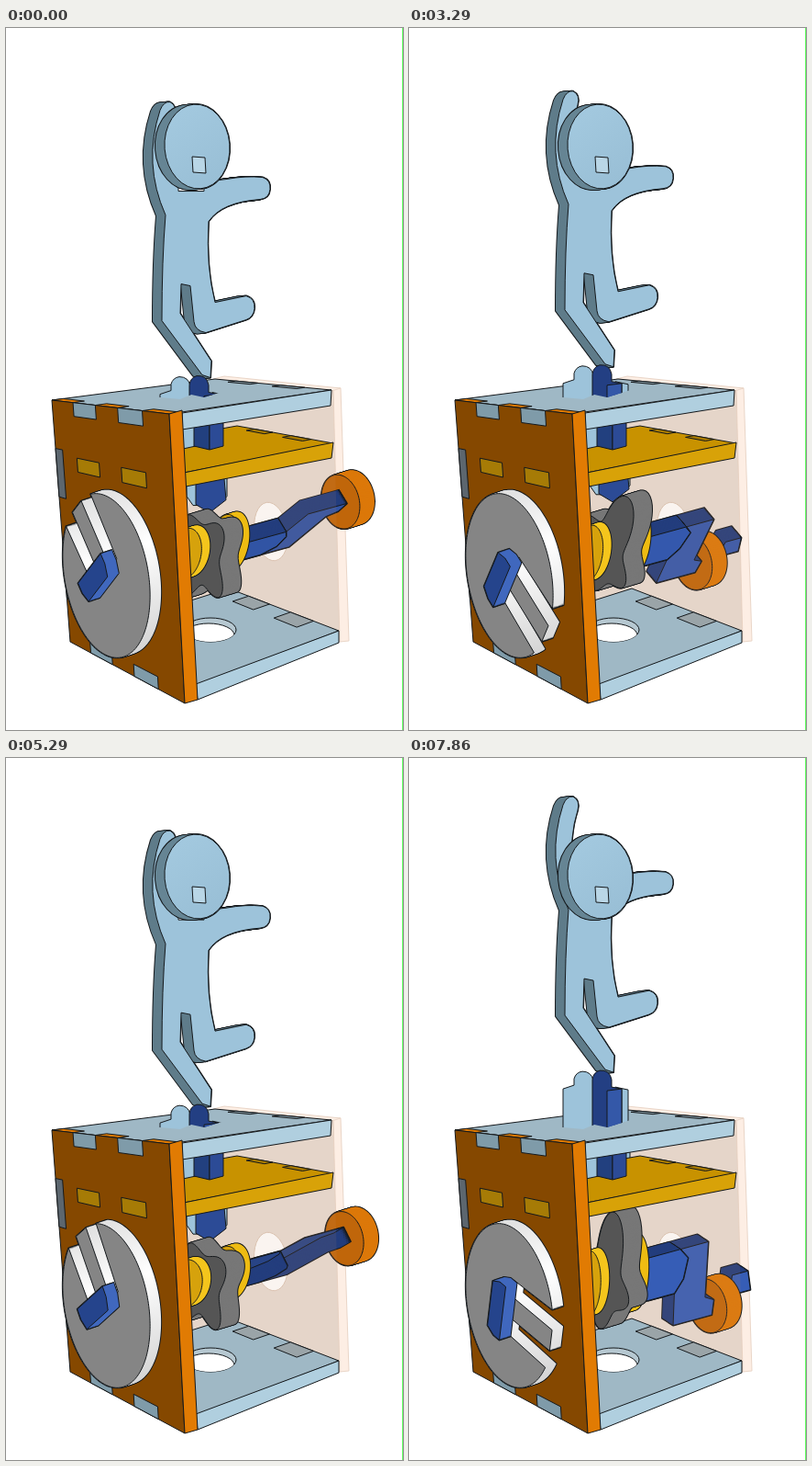
An HTML page with a canvas for the animation above (8 s loop, 433x764 px).

```html
<!DOCTYPE html>
<html lang="en">
<head>
<meta charset="utf-8">
<title>Crank automaton</title>
<style>
html, body { margin: 0; width: 100%; height: 100%; overflow: hidden; background: #fff; }
canvas { display: block; width: 433px; height: 764px; }
</style>
</head>
<body>
<canvas id="stage" width="433" height="764"></canvas>
<script>
const ctx = document.getElementById('stage').getContext('2d');
const LOOP = 8000, STEPS = 56, RAD = Math.PI / 180;
const INK = '#15191c', PALE = '#9dc3da', PLATE = '#9fb8c5', EDGE = '#b0cfdf', NAVY = '#2c4b96', ORANGE = '#e17b03';

// The hand pauses for one step, then turns the crank faster and faster.
function crankAngle(step) {
  const s = step < 3 ? step : step - 1;
  return (37 + 6.56 * s + .1186 * s ** 2 - .0008 * s ** 3) * RAD;
}

// Four cam lobes a quarter turn apart; they shape the cam and raise the dancer.
const LOBES = [25, 18, 59, 25];
const lobeHeight = (a, sharpness) => LOBES.reduce((sum, height, i) =>
  sum + height * Math.exp(sharpness * (Math.cos(a - (90 * i + 2) * RAD) - 1)), 0);
const lift = angle => Math.min(0, 5 - lobeHeight(Math.PI / 2 - angle, 6));

function poly(points) {
  const p = new Path2D();
  points.forEach(([x, y]) => p.lineTo(x, y));
  p.closePath();
  return p;
}

function ellipse(x, y, rx, ry, tilt = 0) {
  const p = new Path2D();
  p.ellipse(x, y, rx, ry, tilt, 0, 7);
  return p;
}

function paint(path, fill, line = INK) {
  ctx.fillStyle = fill;
  ctx.fill(path);
  ctx.strokeStyle = line;
  ctx.lineWidth = 1;
  ctx.stroke(path);
}

function shifted(dx, dy, drawPart) {
  ctx.save();
  ctx.translate(dx, dy);
  drawPart();
  ctx.restore();
}

// Solid made by sweeping a path from (dx, dy) to its own place.
function extrude(path, dx, dy, side, front) {
  const n = Math.ceil(Math.hypot(dx, dy));
  ctx.strokeStyle = INK;
  ctx.lineWidth = 2;
  ctx.fillStyle = side;
  for (const pass of ['stroke', 'fill'])
    for (let i = n; i >= 0; i--) shifted(dx * i / n, dy * i / n, () => ctx[pass](path));
  paint(path, front);
}

// Board with corners a, b (top) and c, d (bottom); rect() works in 0..1 on it.
function board(a, b, c, d) {
  const mix = (p, q, t) => p.map((v, i) => v + (q[i] - v) * t);
  const at = (s, t) => mix(mix(a, b, s), mix(d, c, s), t);
  return { rect: (s0, t0, s1, t1) => poly([at(s0, t0), at(s1, t0), at(s1, t1), at(s0, t1)]) };
}

// Every board carries two finger joints at the same places along its side.
const JOINTS = [[.18, .37], [.56, .77]], GAPS = [[0, .18], [.37, .56], [.77, 1]];
const fingers = (b, spans, t0, t1, fill) => spans.forEach(([s0, s1]) => paint(b.rect(s0, t0, s1, t1), fill));

const front = board([50, 405], [178, 420], [195, 735], [70, 668]);
const corner = board([178, 420], [192, 416], [209, 731], [195, 735]);
const lid = board([50, 405], [178, 420], [355, 394], [228, 382]);
const lidEdge = board([192, 419], [355, 394], [354, 411], [192, 437]);
const shelf = board([252, 433], [357, 452], [194, 484], [110, 458]);
const shelfEdge = board([194, 484], [357, 451], [355, 468], [196, 499]);
const floor = board([243, 610], [363, 656], [208, 715], [100, 655]);
const floorEdge = board([207, 714], [363, 656], [363, 669], [209, 731]);
const panel = board([195, 395], [357, 394], [364, 668], [195, 640]);
const panelEdge = board([357, 392], [365, 392], [374, 667], [364, 668]);
const panelTop = board([226, 382], [238, 379], [365, 392], [355, 395]);
const whole = b => b.rect(0, 0, 1, 1);

// Upright plane seen at an angle: u runs right, v runs up.
const plane = (cx, cy, ux, uy, vx, vy) => (u, v) => [cx + u * ux + v * vx, cy + u * uy + v * vy];
const polar = (map, radius, turn) => poly(Array.from({ length: 120 }, (_, i) => {
  const a = i * 3 * RAD, r = radius(a);
  return map(r * Math.cos(a + turn), r * Math.sin(a + turn));
}));

// Flat piece of the crank; its outline is given along the axle (z) and outwards (r).
function crankPart(outline, angle) {
  const c = Math.cos(angle), s = Math.sin(angle);
  const facing = .5 * c > .8 * s ? 1 : -1, nu = -s * facing, nv = c * facing;
  const at = t => outline.map(([z, r]) =>
    plane(224 + 114 * z, 571 - 31 * z, 46, 11, -8, -62)(r * c + t * nu, r * s + t * nv));
  const near = at(.13), far = at(-.13);
  extrude(poly(near), far[0][0] - near[0][0], far[0][1] - near[0][1], '#233d7d',
    `hsl(222,54%,${34 + 13 * Math.max(0, nu)}%)`);
}

function drawCrank(angle) {
  const [x, y] = plane(333, 543, 46, 11, -8, -60)(Math.cos(angle), Math.sin(angle));
  crankPart([[1.1, .4], [1.25, .4], [1.3, .8], [1.1, .8]], angle);
  extrude(polar(plane(x, y, 21, 5, 0, -29), () => 1, 0), 16, -5, '#dc7809', '#c0660a');
  crankPart([[.3, .45], [.55, .45], [.58, 1.1], [.95, 1.1], [.95, .8], [.86, .7], [.82, -.42], [.3, -.42]], angle);
}

function drawPanel() {
  paint(whole(panel), '#e8dcd3', '#e8dcd3');
  paint(whole(panelEdge), '#fdeee4', '#ead6c8');
  paint(whole(panelTop), '#fdeee4', '#ead6c8');
  paint(ellipse(289, 548, 18, 32, -.15), '#fff', '#dcc8b8');
}

function drawFloor() {
  paint(whole(floor), PLATE);
  fingers(floor, JOINTS, 0, .12, '#9aa4a8');
  paint(whole(floorEdge), EDGE);
  const hole = ellipse(223, 655, 28, 13);
  paint(hole, '#b6c8d1');
  ctx.save();
  ctx.clip(hole);
  paint(ellipse(221, 661, 28, 13), '#fff');
  ctx.restore();
}

function drawFollower() {
  paint(new Path2D('M197 470H241V512L232 522H204L197 512Z'), PALE);
  paint(new Path2D('M207 470H236L240 516L222 530L207 521Z'), NAVY);
}

function drawCams(angle) {
  const cam = a => .4 + .0125 * lobeHeight(a, 9);
  const wing = a => 1 / Math.hypot(Math.cos(a), 1.6 * Math.sin(a));
  extrude(polar(plane(238, 562, 20, 6, -1, -44), wing, angle), 10, -3, '#eebc13', '#d4a00a');
  extrude(polar(plane(214, 572, 42, 12, -2, -74), cam, angle), 20, -6, '#777', '#555');
  extrude(polar(plane(196, 572, 20, 7, -1, -38), wing, angle), 9, -3, '#f4c51d', '#d6a20c');
}

function drawShelves() {
  paint(whole(shelf), '#c89200');
  fingers(shelf, JOINTS, 0, .06, '#a87a00');
  paint(whole(shelfEdge), '#d8a208');
  paint(new Path2D('M192 430H207V455L193 458Z'), PALE);
  paint(new Path2D('M205 430H222V459L205 455Z'), '#22407f');
  paint(new Path2D('M222 430H237V455L222 459Z'), NAVY);
  paint(whole(lid), PLATE);
  fingers(lid, JOINTS, .95, 1, '#879ca7');
  fingers(lid, GAPS, 0, .07, ORANGE);
  paint(whole(lidEdge), EDGE);
}

function drawFront() {
  paint(whole(front), '#854800');
  paint(whole(corner), ORANGE);
  fingers(front, JOINTS, 0, .055, '#7f9ba9');
  fingers(front, JOINTS, .222, .278, '#a67b06');
  fingers(front, JOINTS, .955, 1, '#7f9ba9');
  for (const t of [.2, .62]) paint(front.rect(0, t, .06, t + .2), '#5c666e');
}

function drawDial(angle) {
  const map = plane(109.5, 596, 47.5, 15.5, -3.5, -88);
  const turn = angle + 93 * RAD, c = Math.cos(turn), s = Math.sin(turn);
  const local = ([d, w]) => map(d * c - w * s, d * s + w * c);
  const arc = Array.from({ length: 158 }, (_, i) => [Math.cos((23 + 2 * i) * RAD), Math.sin((23 + 2 * i) * RAD)]);
  const slots = [[.03, -.36], [.03, -.14], [.97, -.14], [.97, .14], [.03, .14], [.03, .36]];
  const rim = ctx.createLinearGradient(90, 500, 165, 685);
  rim.addColorStop(0, '#dcdcdc');
  rim.addColorStop(.4, '#fff');
  rim.addColorStop(1, '#cfcfcf');
  extrude(poly([...arc, ...slots].map(local)), 12, -4, rim, '#858585');
  const staple = [[-.15, -.3], [0, -.36], [.14, -.36], [.14, .36], [0, .36], [-.15, .3]];
  shifted(-14, 3, () => extrude(poly(staple.map(local)), 12, -4, '#4068be', '#25448c'));
}

const bodyShape = new Path2D(`M168 92Q172 82 179 83Q187 87 184 98Q175 125 178 165L215 170L240 167
  Q262 163 280 165Q289 168 288 178Q287 188 277 189Q235 192 221 213Q218 262 228 301L262 294
  Q272 297 271 308Q270 317 262 320L218 334Q206 332 205 322L201 283L191 281L190 313L224 365L223 383
  L214 380L170 321Q170 255 174 206Q149 150 168 92Z`);

function drawDancer(rise) {
  shifted(0, rise, () => {
    extrude(bodyShape, -10, 1, '#5f7c8a', PALE);
    paint(new Path2D('M188 170H216V180H188Z'), '#fff');
  });

  // stand, sliding through the lid
  ctx.save();
  ctx.clip(new Path2D('M160 300H245V393L232 397L216 402L202 399L190 404L168 402H160Z'));
  shifted(0, rise, () => {
    paint(new Path2D('M225 399L239 402V460H225Z'), PALE);
    paint(new Path2D('M168 460V401L180 397V390Q182 383 189 382Q199 382 201 392V460Z'), PALE);
    paint(new Path2D('M200 460V391Q201 383 208 381Q219 380 221 391V399L232 401V460Z'), '#233f83');
    paint(new Path2D('M216 403L232 401V460H216Z'), '#3458a8');
  });
  ctx.restore();

  const shade = ctx.createLinearGradient(180, 90, 240, 170);
  shade.addColorStop(0, '#a3c9df');
  shade.addColorStop(1, '#98bed5');
  extrude(ellipse(208.5, 129, 35.5, 46, -.08), -10, 1, '#668594', shade);
  paint(new Path2D('M203 140L217 141L218 158L204 157Z'), '#b9d6e6');
}

function draw(step) {
  const angle = crankAngle(step), rise = lift(angle);
  ctx.fillStyle = '#fff';
  ctx.fillRect(0, 0, 433, 764);
  drawPanel();
  drawCrank(angle);
  ctx.fillStyle = 'rgba(200,150,110,.1)';
  ctx.fill(whole(panel));
  drawFloor();
  crankPart([[.1, .45], [.55, .45], [.62, .2], [.64, -.2], [.55, -.42], [.1, -.42]], angle);
  shifted(0, rise, drawFollower);
  drawCams(angle);
  drawShelves();
  drawFront();
  drawDial(angle);
  drawDancer(rise);
  ctx.fillStyle = '#5dff5d';
  ctx.fillRect(432, 0, 1, 764);
}

ctx.lineJoin = 'round';
function tick() {
  const time = performance.now() % LOOP;
  draw(Math.min(STEPS - 1, Math.floor(time * STEPS / LOOP + .03)));
  requestAnimationFrame(tick);
}
tick();
</script>
</body>
</html>
```
